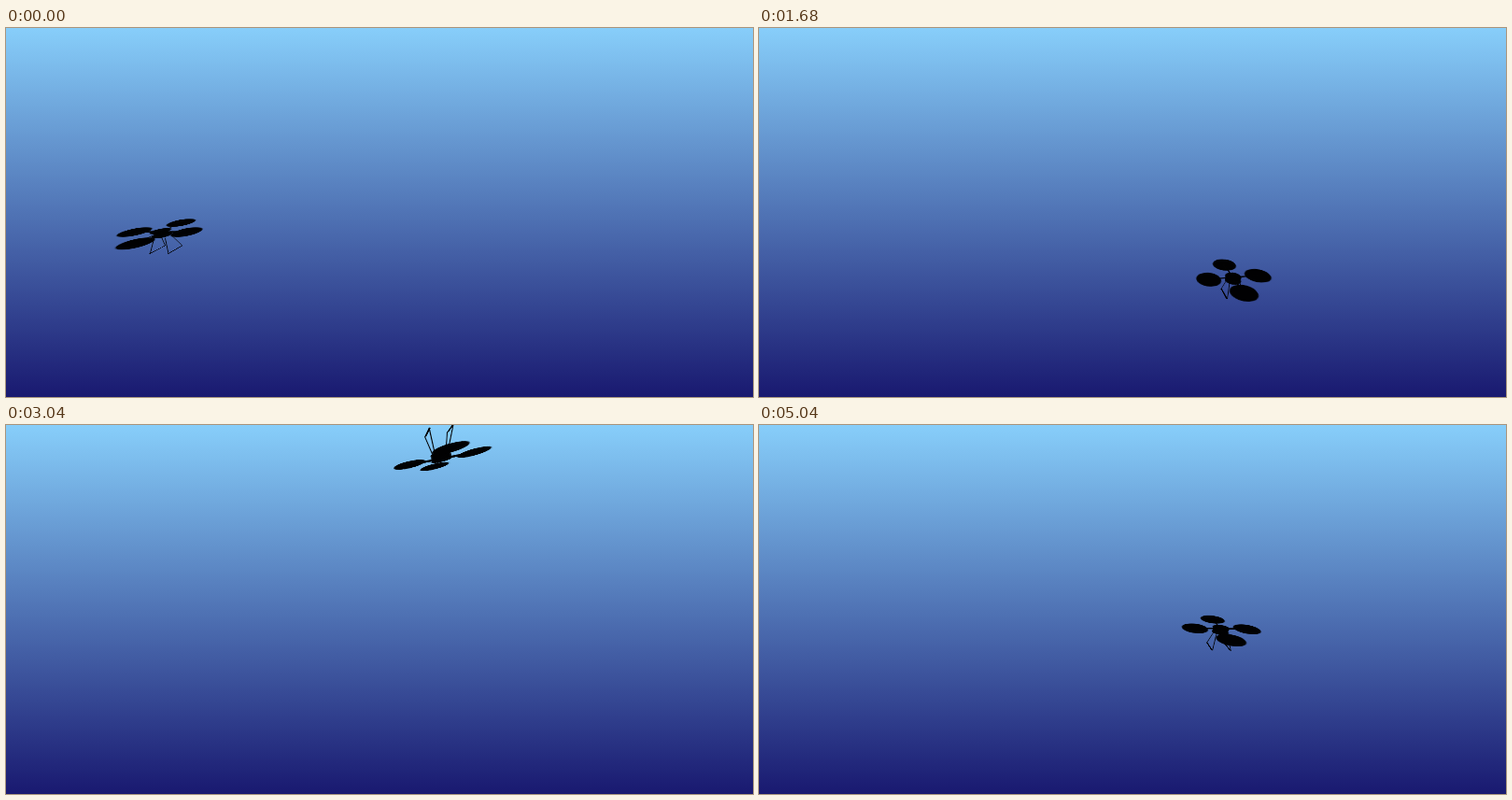
Write an HTML page without scripts that moves like this. It is 800 by 395 pixels and loops after 5080 ms.

```html
<!DOCTYPE html>
<html lang="en">
<head>
<meta charset="utf-8">
<title>Drone flips</title>
<style>
  html, body { margin: 0; width: 100%; height: 100%; overflow: hidden; }

  .stage {
    position: relative;
    width: 100%;
    height: 100%;
    overflow: hidden;
    perspective: 257px;
    background: linear-gradient(#87cefa, #191970);
  }

  /* The flight plane, seen from slightly above */
  .world, .drone, .drone i { position: absolute; }
  .world {
    left: 50%;
    top: 50%;
    transform: rotateX(-18.4deg);
  }
  .world, .drone { transform-style: preserve-3d; }
  .drone { animation: fly 5080ms linear infinite; }
  .drone i { background: #010102; }

  .disc {
    --d: 28px;
    width: var(--d);
    height: var(--d);
    left: calc(var(--d) / -2);
    top: calc(var(--d) / -2);
    border-radius: 50%;
    transform: translate3d(var(--x, 0), var(--y, 0), var(--z, 0)) rotateX(90deg);
  }
  .right { --x: 28.6px; }
  .left { --x: -28.6px; }
  .near { --z: 28.6px; }
  .far { --z: -28.6px; }

  .lid { --d: 18px; --y: -1px; }
  .base { --d: 18px; --y: 4px; }
  .hull { left: -9px; top: -2px; width: 18px; height: 7px; border-radius: 4px; }

  .span { left: -28px; top: -1px; width: 56px; height: 2px; }
  .beam { left: -1px; top: -28px; width: 2px; height: 56px; transform: rotateX(90deg); }

  /* --s is the side (left or right), --n the end (near or far) */
  .leg {
    width: 1px;
    height: 18px;
    left: -0.5px;
    top: 0;
    transform-origin: 50% 0;
    transform: translate3d(calc(var(--s) * 6px), 5.5px, calc(var(--n) * 4px))
      rotateX(calc(var(--n) * 19.8deg)) rotate(calc(var(--s) * -13.2deg));
  }
  .bar {
    width: 2px;
    height: 20px;
    left: -1px;
    top: -10px;
    transform: translate3d(calc(var(--s) * 10px), 21.6px, 0) rotateX(90deg);
  }

  @keyframes fly {
    0% { transform: translate(-240.3px, 21.9px) rotate(0deg); }
    2.36% { transform: translate(-239px, 26px) rotate(3deg); }
    5.51% { transform: translate(-231px, 32.5px) rotate(8deg); }
    7.87% { transform: translate(-221.5px, 29px) rotate(10deg); }
    11.02% { transform: translate(-203.7px, 20.5px) rotate(10deg); }
    14.96% { transform: translate(-162.5px, 14px) rotate(10deg); }
    22.05% { transform: translate(-61.9px, 25.5px) rotate(4deg); }
    27.56% { transform: translate(30px, 55px) rotate(0deg); }
    33.07% { transform: translate(118px, 79.8px) rotate(-5.2deg); }
    34.65% { transform: translate(139px, 82.5px) rotate(-7deg); }
    37.01% { transform: translate(166px, 62px) rotate(-10deg); }
    38.58% { transform: translate(180px, 35px) rotate(-11deg); }
    41.34% { transform: translate(170px, -35px) rotate(-12deg); }
    42.91% { transform: translate(149px, -76px) rotate(-18deg); }
    44.09% { transform: translate(129px, -100px) rotate(-40deg); }
    45.67% { transform: translate(108px, -113px) rotate(-95deg); }
    47.24% { transform: translate(88.9px, -114.6px) rotate(-157.2deg); }
    50.39% { transform: translate(30px, -82px) rotate(-285deg); }
    51.97% { transform: translate(1px, -56px) rotate(-340deg); }
    53.15% { transform: translate(-10px, -47px) rotate(-354deg); }
    55.12% { transform: translate(-3.5px, -61px) rotate(-348deg); }
    57.48% { transform: translate(18px, -108px) rotate(-268deg); }
    59.84% { transform: translate(54.4px, -141.2px) rotate(-190.6deg); }
    62.99% { transform: translate(96px, -138px) rotate(-68deg); }
    64.96% { transform: translate(123px, -121px) rotate(-12deg); }
    66.14% { transform: translate(139px, -105.5px) rotate(-9deg); }
    67.72% { transform: translate(174px, -52px) rotate(-12deg); }
    69.29% { transform: translate(199px, 5px) rotate(-13deg); }
    70.87% { transform: translate(204px, 46px) rotate(-10deg); }
    72.44% { transform: translate(199.5px, 64px) rotate(-6.8deg); }
    73.62% { transform: translate(192px, 65px) rotate(-5deg); }
    77.17% { transform: translate(162.6px, 45.6px) rotate(-2deg); }
    82.68% { transform: translate(129px, 28px) rotate(1deg); }
    88.19% { transform: translate(108.5px, 22.5px) rotate(2deg); }
    99.21%, 100% { transform: translate(97.1px, 21.6px) rotate(1.1deg); }
  }
</style>
</head>
<body>
<div class="stage">
  <div class="world">
    <div class="drone">
      <i class="disc far"></i>
      <i class="disc left"></i>
      <i class="disc right"></i>
      <i class="span"></i>
      <i class="beam"></i>
      <i class="leg" style="--s:-1;--n:-1"></i>
      <i class="leg" style="--s:-1;--n:1"></i>
      <i class="leg" style="--s:1;--n:-1"></i>
      <i class="leg" style="--s:1;--n:1"></i>
      <i class="bar" style="--s:-1"></i>
      <i class="bar" style="--s:1"></i>
      <i class="disc base"></i>
      <i class="hull"></i>
      <i class="disc lid"></i>
      <i class="disc near"></i>
    </div>
  </div>
</div>
</body>
</html>
```
